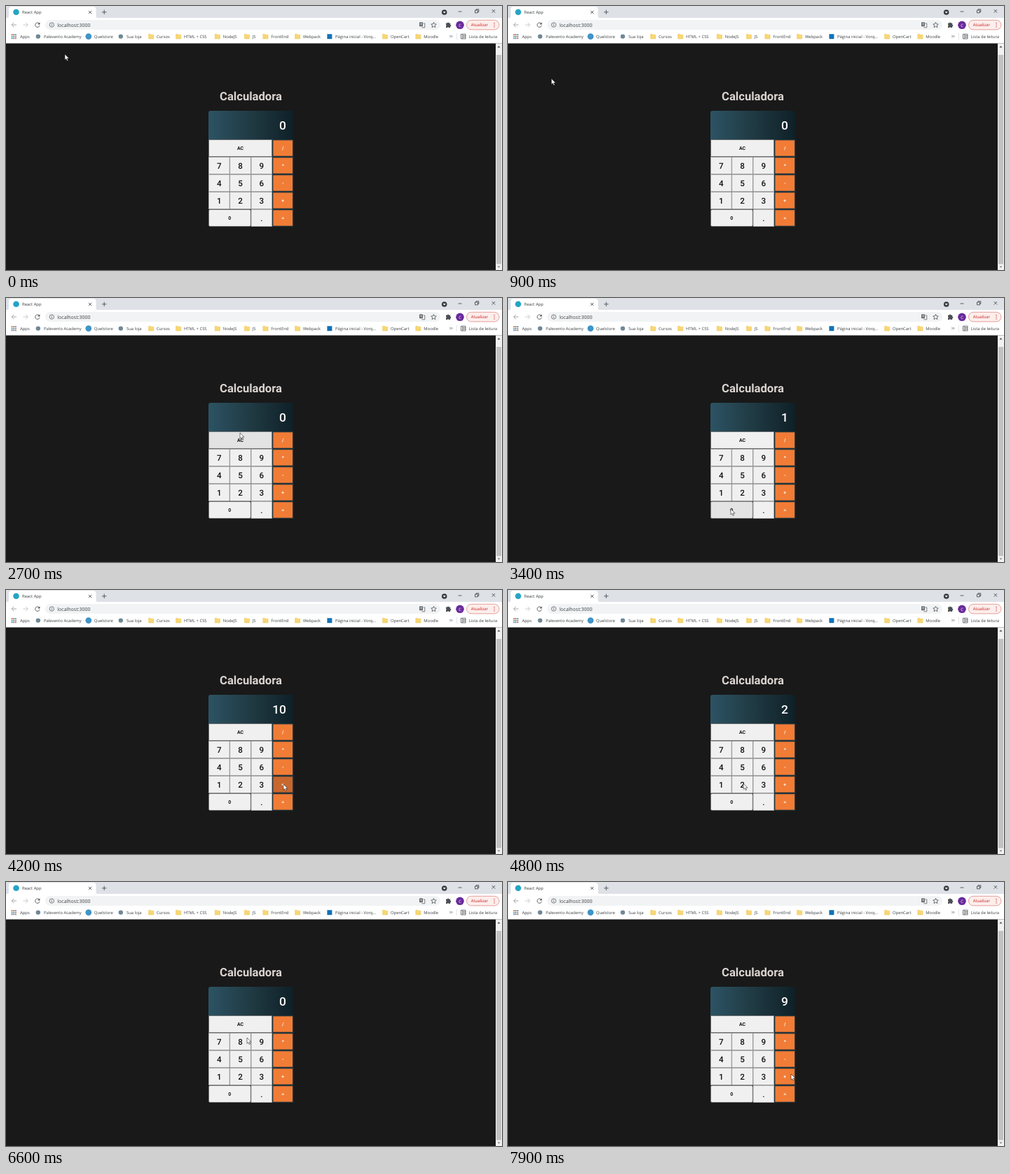
Animation, 708 px wide and 378 px high, one loop 8 s. Source, as an HTML page:

```html
<!DOCTYPE html>
<html lang="pt-BR">
<head>
<meta charset="utf-8">
<title>Calculadora</title>
<style>
  html, body { margin: 0; width: 100%; height: 100%; overflow: hidden; background: #191919; }
  #stage { position: relative; width: 708px; height: 378px; overflow: hidden; }
  svg { position: absolute; left: 0; top: 0; display: block; }
  text { text-rendering: geometricPrecision; }
  .ui text { font: 5.9px "Open Sans", "Noto Sans", sans-serif; fill: #3c4043; }
  .ui .url { font-size: 7px; }
  .line { fill: none; stroke: #4b4f53; stroke-width: .9; }
  .calc text { font: 500 11.6px Roboto, Arial, sans-serif; fill: #111; text-anchor: middle; }
  .calc .small { font-size: 6.9px; font-weight: 700; }
  .calc .op { fill: #fff; }
  .calc .title { font-size: 16.6px; font-weight: 700; fill: #dcd5d1; }

  .display {
    position: absolute; left: 289px; top: 150px; width: 121px; height: 41px;
    border-radius: 3px 3px 0 0; overflow: hidden;
    background: linear-gradient(to right, #2c5364, #203a43 50%, #0f2027);
  }
  .reel {
    text-align: right; padding-right: 10px; color: #fff;
    font: 500 17.4px/42px Roboto, Arial, sans-serif;
    animation: reel 8s step-end infinite;
  }
  .reel div { height: 42px; }
  @keyframes reel {
    0% { transform: translateY(0); }
    38.75% { transform: translateY(-42px); }
    43.75% { transform: translateY(-84px); }
    60% { transform: translateY(-126px); }
    63.75% { transform: translateY(-168px); }
    67.5% { transform: translateY(-210px); }
    78.75% { transform: translateY(-252px); }
    92.5%, 100% { transform: translateY(-294px); }
  }

  .press { opacity: 0; animation: press 8s step-end infinite; }
  @keyframes press {
    0% { opacity: 1; }
    1.25%, 100% { opacity: 0; }
  }

  .cursor { animation: roam 8s infinite; }
  @keyframes roam {
    0% { transform: translate(84px, 69px); animation-timing-function: steps(3); }
    3.75% { transform: translate(230px, 135px); animation-timing-function: steps(2); }
    6.25% { transform: translate(390px, 195px); animation-timing-function: steps(2); }
    8.75% { transform: translate(215px, 150px); animation-timing-function: steps(2); }
    11.25% { transform: translate(62px, 104px); }
    13.75% { transform: translate(62px, 104px); animation-timing-function: steps(4); }
    18.75% { transform: translate(76px, 202px); }
    20% { transform: translate(76px, 202px); animation-timing-function: steps(3); }
    23.75% { transform: translate(550px, 227px); animation-timing-function: steps(2); }
    26.25% { transform: translate(660px, 293px); animation-timing-function: steps(4); }
    31.25% { transform: translate(334px, 193px); }
    33.75% { transform: translate(334px, 193px); animation-timing-function: steps(3); }
    37.5% { transform: translate(303px, 277px); }
    38.75% { transform: translate(303px, 277px); animation-timing-function: steps(3); }
    42.5% { transform: translate(318px, 302px); }
    43.75% { transform: translate(318px, 302px); animation-timing-function: steps(6); }
    51.25% { transform: translate(396px, 278px); }
    53.75% { transform: translate(396px, 278px); animation-timing-function: steps(4); }
    58.75% { transform: translate(336px, 277px); }
    60% { transform: translate(336px, 277px); animation-timing-function: steps(2); }
    62.5% { transform: translate(320px, 302px); }
    63.75% { transform: translate(320px, 302px); animation-timing-function: steps(2); }
    66.25% { transform: translate(394px, 298px); animation-timing-function: steps(1); }
    67.5% { transform: translate(393px, 296px); animation-timing-function: steps(7); }
    76.25% { transform: translate(340px, 198px); }
    78.75% { transform: translate(340px, 198px); animation-timing-function: steps(3); }
    82.5% { transform: translate(344px, 223px); animation-timing-function: steps(2); }
    85% { transform: translate(338px, 234px); }
    86.25% { transform: translate(338px, 234px); animation-timing-function: steps(4); }
    91.25% { transform: translate(366px, 228px); }
    92.5% { transform: translate(366px, 228px); animation-timing-function: steps(5); }
    98.75%, 100% { transform: translate(404px, 275px); }
  }
</style>
</head>
<body>
<div id="stage">
  <svg width="708" height="378" viewBox="0 0 708 378">
    <rect width="708" height="378" fill="#191919"/>

    <g class="ui">
      <rect width="708" height="18" fill="#dee1e6"/>
      <rect y="17" width="708" height="36.5" fill="#fff"/>
      <path d="M0 18q4 0 4-4V5q0-4 4-4H124.500q4 0 4 4v9q0 4 4 4z" fill="#fff"/>
      <circle cx="14.500" cy="8.800" r="4.300" fill="#25a4c4"/>
      <text x="23" y="11">React App</text>
      <path class="line" d="M118 6.800l4.200 4.200m0-4.200l-4.200 4.200M137 8.800h6.400m-3.200-3.200v6.400"/>
      <circle cx="625.700" cy="9" r="3.800" fill="#3b3e42"/>
      <path d="M623.700 8h4l-2 2.500z" fill="#fff"/>
      <path class="line" d="M645.500 8h5M669.500 6h3.800v3.800h-3.800zM671 6v-1.300h3.800v3.800h-1.500M693.600 5l4.600 4.600m0-4.600l-4.600 4.600"/>

      <path class="line" d="M15 27H8.300m3-3.200l-3.200 3.200 3.200 3.200" style="stroke:#9a9da1"/>
      <path class="line" d="M24.500 27h6.700m-3-3.200l3.200 3.200-3.200 3.200" style="stroke:#c3c5c8"/>
      <path class="line" d="M47.300 25a3.200 3.200 0 1 0 .7 3"/>
      <path d="M48.400 23.300v3.200h-3.200z" fill="#4b4f53"/>
      <rect x="56" y="20" width="564" height="14" rx="7" fill="#f1f3f4"/>
      <circle class="line" cx="65.300" cy="27" r="3.200" style="stroke-width:.7"/>
      <path class="line" d="M65.300 26.500v2.200m0-3.800v.8" style="stroke-width:.8"/>
      <text class="url" x="73.300" y="29.600">localhost:3000</text>
      <rect x="590" y="23.200" width="5" height="6" rx=".6" fill="#6b7075"/>
      <path class="line" d="M595.500 25h2.300v5.800h-4.300M591.300 25.200h2.500m-1.200 0v2" style="stroke-width:.7"/>
      <path d="M591.300 25.300h2.500m-1.200 0v2.200" stroke="#fff" stroke-width=".7"/>
      <path class="line" style="stroke-width:.8" d="M610.500 23.300l1.100 2.500 2.700.3-2 1.800.6 2.700-2.400-1.400-2.400 1.400.6-2.700-2-1.800 2.700-.3z"/>
      <path d="M628 24.600h2a1.100 1.100 0 0 1 2.200 0h2v2.200a1.100 1.100 0 0 1 0 2.200v2h-2.200a1.100 1.100 0 0 0-2 0h-2v-2.200a1.100 1.100 0 0 0 0-2z" fill="#4b4f53"/>
      <circle cx="648" cy="27.300" r="5.800" fill="#6a2a9c"/>
      <text x="646.200" y="29.500" style="fill:#fff">C</text>
      <rect x="657.500" y="20.300" width="46.500" height="13.600" rx="6.800" fill="#fdeeec" stroke="#df8a84" stroke-width=".8"/>
      <text x="663.800" y="29.300" style="fill:#c5221f">Atualizar</text>
      <path d="M697 24.500v.01M697 27.200v.01M697 29.900v.01" stroke="#c5221f" stroke-width="1.300" stroke-linecap="round"/>

      <g id="marks"></g>
      <path class="line" d="M633.300 41.800l1.600 1.600-1.600 1.600m2.200-3.200l1.600 1.600-1.600 1.600" style="stroke-width:.7"/>
      <path d="M643.300 38.500v10" stroke="#d0d3d7" stroke-width=".6"/>
      <path class="line" d="M649.500 40.300h6.500v6.600h-6.500zM651.800 40.300v6.600M652 42.500h4M652 44.700h4" style="stroke-width:.8"/>
      <text x="660.800" y="45.800">Lista de leitura</text>

      <rect x="699" y="53.500" width="9" height="325" fill="#f1f1f1"/>
      <rect x="700" y="70" width="7" height="299.500" fill="#c1c1c1"/>
      <path d="M701.500 59.500l2-2.500 2 2.500z" fill="#505050"/>
      <path d="M701.500 372.500l2 2.500 2-2.500z" fill="#8a8a8a"/>
    </g>

    <g class="calc">
      <text class="title" x="349.500" y="134.800">Calculadora</text>
      <g id="keys"></g>
    </g>
  </svg>

  <div class="display"><div class="reel">
    <div>0</div><div>1</div><div>10</div><div>2</div><div>20</div><div>30</div><div>0</div><div>9</div>
  </div></div>

  <svg width="708" height="378" viewBox="0 0 708 378">
    <path class="cursor" d="M0 0V8.300L1.900 6.600 3.200 9.600 4.600 9 3.300 6.100H5.900z" fill="#fff" stroke="#222" stroke-width=".6" stroke-linejoin="round"/>
  </svg>
</div>

<script>
  const add = (parent, tag, attrs, text) => {
    const el = document.createElementNS('http://www.w3.org/2000/svg', tag);
    for (const k in attrs) el.setAttribute(k, attrs[k]);
    if (text) el.textContent = text;
    parent.append(el);
    return el;
  };

  // Bookmarks bar: [text x, label, icon]
  const marks = document.getElementById('marks');
  const folder = x => add(marks, 'path', {
    d: `M${x - 11.5} 40.200h2.800l.8 1h3.700v5.800h-7.300z`, fill: '#f7d774', stroke: '#e6bd4c', 'stroke-width': .4
  });
  const dot = (x, r, fill) => add(marks, 'circle', { cx: x - 8.2, cy: 43.6, r, fill });
  const slate = x => dot(x, 3.2, '#6f8796');
  const blue = x => dot(x + .2, 4.4, '#3f94c8');
  const square = x => add(marks, 'rect', { x: x - 11.6, y: 40.2, width: 7, height: 7, fill: '#1272b8' });
  const grid = x => {
    const hues = ['#d95b50', '#4f9a5f', '#4a7fd0'];
    for (let i = 0; i < 9; i++) add(marks, 'rect', {
      x: x - 12.3 + i % 3 * 2.6, y: 40.2 + Math.floor(i / 3) * 2.6,
      width: 1.8, height: 1.8, fill: hues[(i + Math.floor(i / 3)) % 3]
    });
  };
  [
    [20, 'Apps', grid], [54, 'Palevento Academy', slate], [125.8, 'Quelstore', blue],
    [172, 'Sua loja', slate], [215, 'Cursos', folder], [254, 'HTML + CSS', folder],
    [309.7, 'NodeJS', folder], [351.8, 'JS', folder], [378.3, 'FrontEnd', folder],
    [424, 'Webpack', folder], [470, 'Página inicial - Vorq...', square],
    [549, 'OpenCart', folder], [596.3, 'Moodle', folder]
  ].forEach(([x, label, icon]) => {
    icon(x);
    add(marks, 'text', { x, y: 45.8 }, label);
  });

  // Keypad: [label, column, row, span, press times in seconds]
  const keys = document.getElementById('keys');
  const W = 30.35, H = 25;
  const key = (label, col, row, span = 1, presses = []) => {
    const op = col === 3, wide = span > 1;
    const x = 289 + col * W, y = 191 + row * H, w = span * W;
    const edge = op ? '#20343c' : wide ? '#66686a' : '#aaa';
    const line = op ? 1.3 : wide ? .8 : .7;
    const face = { x: x + line / 2, y: y + line / 2, width: w - line, height: H - line,
      rx: row === 4 && col === 0 ? 2 : 0, stroke: edge, 'stroke-width': line };
    add(keys, 'rect', { ...face, fill: op ? '#f17c36' : '#f0f0f0' });
    presses.forEach(t => add(keys, 'rect', {
      ...face, fill: op ? '#c8672e' : '#e3e3e3', class: 'press', style: `animation-delay:${t}s`
    }));
    const small = op || wide;
    add(keys, 'text', {
      x: x + w / 2, y: y + H / 2 + (small ? 2.4 : 4.1),
      class: (small ? 'small' : '') + (op ? ' op' : '')
    }, label);
  };
  const pressed = { 1: [3], 2: [4.7], 9: [7.3], '+': [4.2], '=': [5.3] };
  key('AC', 0, 0, 3, [2.7, 6.2]);
  ['789', '456', '123'].forEach((digits, r) =>
    [...digits].forEach((d, c) => key(d, c, r + 1, 1, pressed[d])));
  key('0', 0, 4, 2, [3.4, 5]);
  key('.', 2, 4);
  [...'/*-+='].forEach((sign, r) => key(sign, 3, r, 1, pressed[sign]));
</script>
</body>
</html>
```
